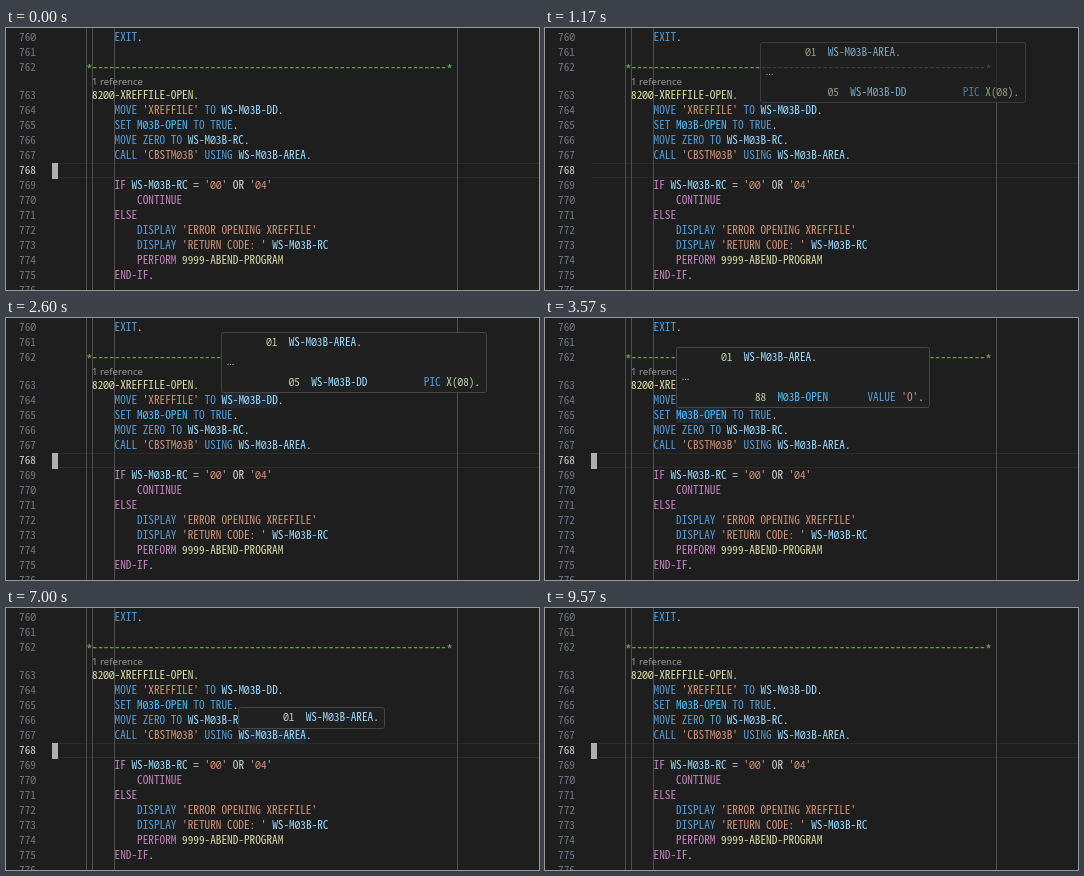
Animation, 533 px wide and 262 px high, one loop 9660 ms. Source, as an HTML page with a canvas:

```html
<!DOCTYPE html>
<html lang="en">
<head>
<meta charset="utf-8">
<title>Hover previews in a COBOL editor</title>
<style>
html, body { margin: 0; width: 100%; height: 100%; overflow: hidden; background: #1e1e1e; }
canvas { display: block; width: 533px; height: 262px; }
</style>
</head>
<body>
<canvas id="stage" width="533" height="262"></canvas>
<script>
const ctx = document.getElementById('stage').getContext('2d');
const W = 533, H = 262, LOOP = 9660;
const COL = 5.63, LEFT = 46.6, ROW = 15;
const MONO = '"Noto Sans Mono CJK JP", "Noto Sans Mono CJK SC", "Noto Sans Mono", monospace';
const SANS = '9.6px "Noto Sans", "Open Sans", sans-serif';
const ZERO = 'extra-condensed 10.8px "Noto Sans Mono", monospace';

const color = {
  bg: '#1e1e1e', text: '#d4d4d4', number: '#6e7681', active: '#cccccc',
  ruler: '#4e4e4e', lineEdge: '#2b2b2b', caret: '#aeafad', lens: '#999999',
  hoverBg: '#202020', hoverEdge: '#454545', highlight: '#212b35',
  control: '#c586c0', keyword: '#569cd6', string: '#ce9178', para: '#dcdcaa',
  level: '#b5cea8', name: '#9cdcfe', flag: '#4fc1ff', comment: '#6a9955'
};

const CONTROL = /^(IF|CONTINUE|ELSE|PERFORM|END-IF)$/;
const KEYWORD = /^(EXIT|CALL|MOVE|TO|SET|TRUE|ZERO|USING|DISPLAY|PIC|VALUE)$/;

const FIRST = 760;
const code = [
  '           EXIT.',
  '',
  '      *' + '-'.repeat(63) + '*',
  '       8200-XREFFILE-OPEN.',
  "           MOVE 'XREFFILE' TO WS-M03B-DD.",
  '           SET M03B-OPEN TO TRUE.',
  '           MOVE ZERO TO WS-M03B-RC.',
  "           CALL 'CBSTM03B' USING WS-M03B-AREA.",
  '',
  "           IF WS-M03B-RC = '00' OR '04'",
  '               CONTINUE',
  '           ELSE',
  "               DISPLAY 'ERROR OPENING XREFFILE'",
  "               DISPLAY 'RETURN CODE: ' WS-M03B-RC",
  '               PERFORM 9999-ABEND-PROGRAM',
  '           END-IF.',
  ''
];
const ACTIVE = 768;

const AREA = '       01  WS-M03B-AREA.';
const field = (name, pic) => '           05  ' + name.padEnd(20) + 'PIC ' + pic + '.';

// col and len locate the hovered word on its line
const hovers = [
  { from: 1030, fade: 240, to: 2870, line: 764, col: 30, len: 10, w: 266, detail: field('WS-M03B-DD', 'X(08)') },
  { from: 2870, fade: 300, to: 4970, line: 765, col: 15, len: 9, w: 254,
    detail: "             88  M03B-OPEN       VALUE 'O'." },
  { from: 4970, to: 7000, line: 766, col: 24, len: 10, w: 266, detail: field('WS-M03B-RC', 'X(02)') },
  { from: 7000, to: 8600, out: 730, line: 767, col: 33, len: 12, w: 147 }
];

ctx.font = '100px ' + MONO;
const codeSize = (100 * COL / ctx.measureText('M').width).toFixed(2) + 'px ';
const codeFont = codeSize + MONO;

const clamp = v => Math.max(0, Math.min(1, v));
// The code lens pushes everything after line 762 down.
const lineTop = n => n < 763 ? 2 + (n - FIRST) * ROW : 60 + (n - 763) * ROW;

function rect(x, y, w, h, fill) {
  ctx.fillStyle = fill;
  ctx.fillRect(x, y, w, h);
}

function print(s, x, y, fill, font) {
  ctx.font = font;
  ctx.fillStyle = fill;
  ctx.fillText(s, x, y);
}

// Zeros come from a face that slashes them, centred in their cells.
function printMono(s, x, y, fill) {
  print(s.replaceAll('0', ' '), x, y, fill, codeFont);
  ctx.textAlign = 'center';
  for (const m of s.matchAll(/0/g)) print('0', x + (m.index + 0.5) * COL, y, fill, ZERO);
  ctx.textAlign = 'left';
}

function tokenColor(s) {
  if (s[0] === "'") return color.string;
  if (CONTROL.test(s)) return color.control;
  if (KEYWORD.test(s)) return color.keyword;
  if (/^\d{4}-/.test(s)) return color.para;
  if (/^\d\d$|^X\(/.test(s)) return color.level;
  if (s === 'M03B-OPEN') return color.flag;
  return /^WS-/.test(s) ? color.name : color.text;
}

function printComment(s, x, y) {
  const bold = 'bold ' + codeFont;
  for (const m of s.matchAll(/\*|-+/g)) {
    // Stars sit level with the dashes.
    print(m[0], x + m.index * COL, m[0] === '*' ? y + 2 : y, color.comment, bold);
  }
}

function printCode(s, x, y) {
  if (s[6] === '*') {
    printComment(s, x, y);
    return;
  }
  for (const m of s.matchAll(/'[^']*'|[\w()-]+|[.=]/g)) {
    printMono(m[0], x + m.index * COL, y, tokenColor(m[0]));
  }
}

function drawEditor(shown) {
  rect(0, 0, W, H, color.bg);
  const top = lineTop(ACTIVE);
  rect(LEFT, top, W, 1, color.lineEdge);
  rect(LEFT, top + ROW - 1, W, 1, color.lineEdge);
  for (const h of shown) {
    ctx.globalAlpha = h.alpha;
    rect(LEFT + h.col * COL, lineTop(h.line), h.len * COL, ROW, color.highlight);
  }
  ctx.globalAlpha = 1;
  for (const c of [6, 7, 11, 72]) rect(Math.floor(LEFT + c * COL), 0, 1, H, color.ruler);
  code.forEach((s, i) => {
    const n = FIRST + i, y = lineTop(n) + 11;
    printMono(String(n), 13.1, y, n === ACTIVE ? color.active : color.number);
    printCode(s, LEFT, y);
  });
  print('1 reference', LEFT + 7 * COL, 57, color.lens, SANS);
}

function drawHover(h) {
  const height = h.detail ? 61 : 22;
  const x = Math.floor(LEFT + h.col * COL), y = lineTop(h.line) + (h.detail ? 0 : 1) - height;
  ctx.globalAlpha = h.alpha;
  ctx.beginPath();
  ctx.roundRect(x + 0.5, y + 0.5, h.w - 1, height - 1, 2);
  ctx.fillStyle = color.hoverBg;
  ctx.fill();
  ctx.strokeStyle = color.hoverEdge;
  ctx.lineWidth = 1;
  ctx.stroke();
  printCode(AREA, x + 5.7, y + 14);
  if (h.detail) {
    print('…', x + 5.7, y + 32.5, color.active, SANS);
    printCode(h.detail, x + 5.7, y + 54);
  }
  ctx.globalAlpha = 1;
}

function hoverAlpha(h, t) {
  if (t < h.from) return 0;
  if (t >= h.to) return h.out ? 1 - clamp((t - h.to) / h.out) : 0;
  return h.fade ? clamp((t - h.from + 33) / h.fade) : 1;
}

function draw(t) {
  const shown = hovers.map(h => ({ ...h, alpha: hoverAlpha(h, t) })).filter(h => h.alpha > 0);
  drawEditor(shown);
  shown.forEach(drawHover);
  const caretOn = (t + 440) % 1000 < 500;
  if (caretOn) rect(46, lineTop(ACTIVE), 6, 16, color.caret);
}

const start = performance.now();
function tick() {
  draw((performance.now() - start) % LOOP);
  requestAnimationFrame(tick);
}
tick();
</script>
</body>
</html>
```
